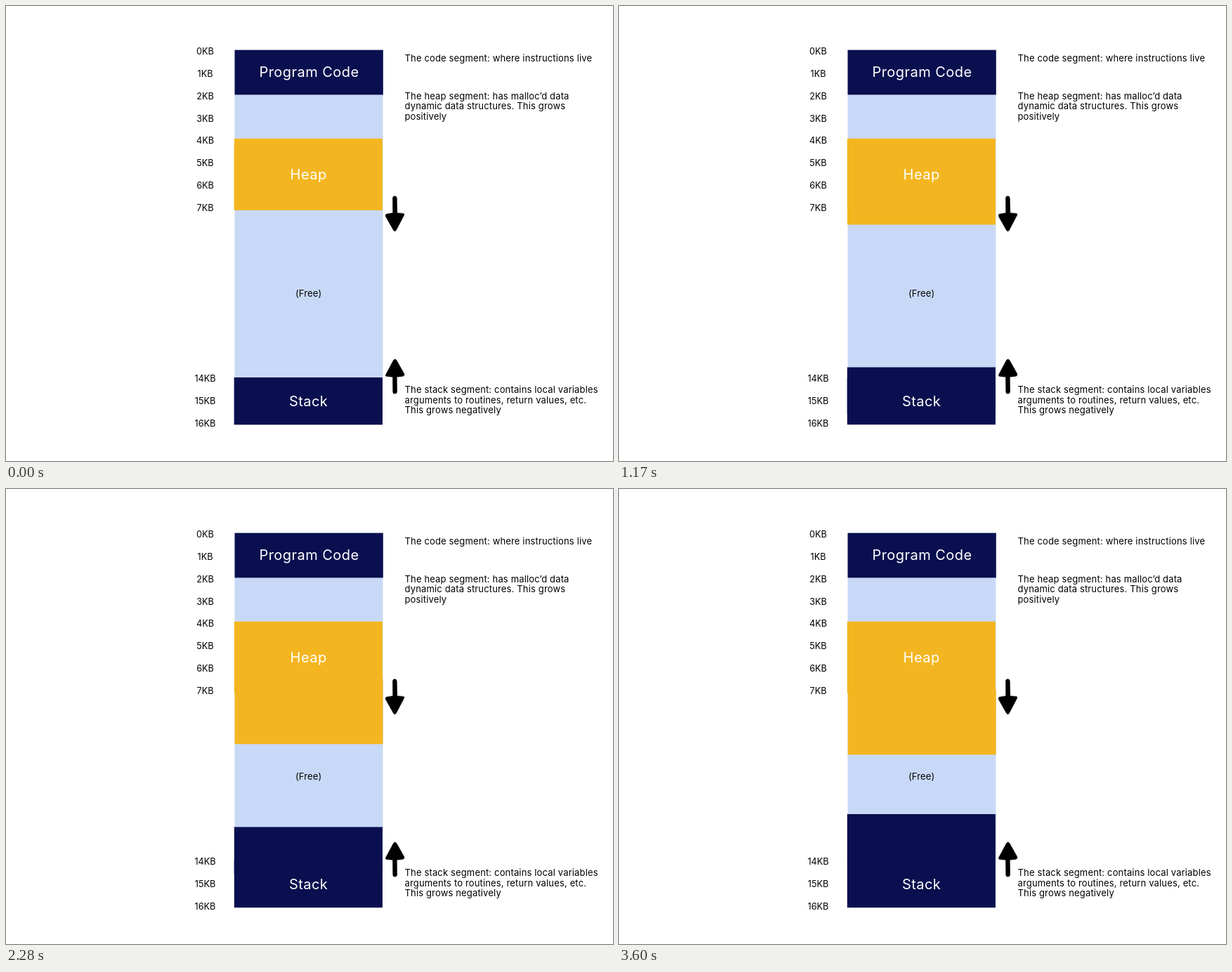
Write an HTML page that moves like this. It is 864 px wide and 648 px high and loops after 4.35 s.

```html
<!DOCTYPE html>
<html lang="en">
<head>
<meta charset="utf-8">
<title>Address space segments</title>
<style>
  html, body { margin: 0; width: 100%; height: 100%; overflow: hidden; background: #fff; }
  svg { display: block; width: 864px; height: 648px; }
  text { font: 13px Inter, "Open Sans", sans-serif; letter-spacing: .15px; fill: #000; }
  .mid { text-anchor: middle; }
  .kb { font-size: 12.7px; letter-spacing: 0; }
  .title { font-size: 20px; letter-spacing: .45px; fill: #fff; }
  .navy { fill: #0a0f4f; }
  .gold { fill: #f4b620; }
  .light { fill: #c8d9f7; }
  path { stroke: #000; stroke-width: .5; }
</style>
</head>
<body>
<svg viewBox="0 0 864 648">
  <rect class="light" x="325.5" y="126" width="211" height="403"/>
  <rect class="navy" x="325.5" y="62.6" width="211.3" height="63.8"/>
  <rect class="gold" id="heap" width="211" height="93"/>
  <rect class="gold" x="324.8" y="188.8" width="211.1" height="102"/>
  <rect class="navy" x="324.8" y="529" width="211.1" height="67.2"/>
  <rect class="navy" id="stack" x="324.8" width="211.1" height="67.2"/>
  <path d="M550.4 273Q551 270.5 553.5 270.7Q556.3 271 556.3 274L556.8 294.7L565.5 295.4Q567.8 295.6 566.3 298.5L555.6 319Q553.6 322.3 551.4 319.2L540.4 299.8Q539.2 296.3 543 296L550.6 294.7Z"/>
  <path d="M556.6 549.8Q556 552.3 553.5 552.2Q550.6 552 550.7 549L550.4 528.3L542 527.6Q539.3 527 540.8 524.4L551.3 504.8Q553.5 501.2 555.9 504.4L566.6 523.4Q568 527 564.2 527.4L556.3 528.3Z"/>
  <g id="labels"></g>
</svg>
<script>
const LOOP = 4350, STEP = 30;

// [time in ms, edge y]
const heapBottom = [[0, 290.5], [400, 290.5], [750, 295.5], [1170, 311.5], [1980, 351.2],
  [2550, 371.6], [2880, 377], [3600, 378.5]];
const stackTop = [[0, 529], [570, 526], [750, 523], [1170, 514.5], [1980, 490],
  [2550, 474.5], [2880, 468.2], [3600, 463]];

const $ = id => document.getElementById(id);

function addText(x, y, cls, str) {
  const el = document.createElementNS('http://www.w3.org/2000/svg', 'text');
  el.setAttribute('x', x);
  el.setAttribute('y', y);
  el.setAttribute('class', cls);
  el.textContent = str;
  $('labels').append(el);
}

const addNote = (y, lines) => lines.forEach((s, i) => addText(567.5, y + i * 14.5, '', s));

for (let k = 0; k < 8; k++) addText(283.5, 69.4 + k * 31.75, 'mid kb', k + 'KB');
for (let k = 14; k < 17; k++) addText(283.5, 535.2 + (k - 14) * 31.7, 'mid kb', k + 'KB');

addText(431.5, 101.2, 'mid title', 'Program Code');
addText(430.6, 246.6, 'mid title', 'Heap');
addText(430.6, 569.9, 'mid title', 'Stack');
addText(430.6, 414, 'mid', '(Free)');

addNote(78.5, ['The code segment: where instructions live']);
addNote(132.8, ['The heap segment: has malloc’d data',
  'dynamic data structures. This grows', 'positively']);
addNote(551.2, ['The stack segment: contains local variables',
  'arguments to routines, return values, etc.', 'This grows negatively']);

// Monotone cubic interpolation, flat at both ends
function curve(pts) {
  const n = pts.length - 1;
  const sec = i => (pts[i + 1][1] - pts[i][1]) / (pts[i + 1][0] - pts[i][0]);
  const slope = pts.map((_, i) => {
    if (i === 0 || i === n) return 0;
    const a = sec(i - 1), b = sec(i);
    return a * b <= 0 ? 0 : 2 * a * b / (a + b);
  });
  return t => {
    if (t >= pts[n][0]) return pts[n][1];
    let i = 0;
    while (t >= pts[i + 1][0]) i++;
    const [t0, y0] = pts[i], [t1, y1] = pts[i + 1];
    const h = t1 - t0, u = (t - t0) / h, v = 1 - u;
    return y0 * v * v * (1 + 2 * u) + y1 * u * u * (1 + 2 * v)
      + h * u * v * (slope[i] * v - slope[i + 1] * u);
  };
}

const heapAt = curve(heapBottom), stackAt = curve(stackTop);
const start = performance.now();

function draw(now) {
  const t = Math.floor(Math.max(0, now - start) % LOOP / STEP) * STEP;
  const bottom = heapAt(t);
  // The heap block drifts slightly right as it slides down
  $('heap').setAttribute('x', 324.8 + (bottom - heapAt(0)) / 100);
  $('heap').setAttribute('y', bottom - 93);
  $('stack').setAttribute('y', stackAt(t));
  requestAnimationFrame(draw);
}
draw(start);
</script>
</body>
</html>
```
